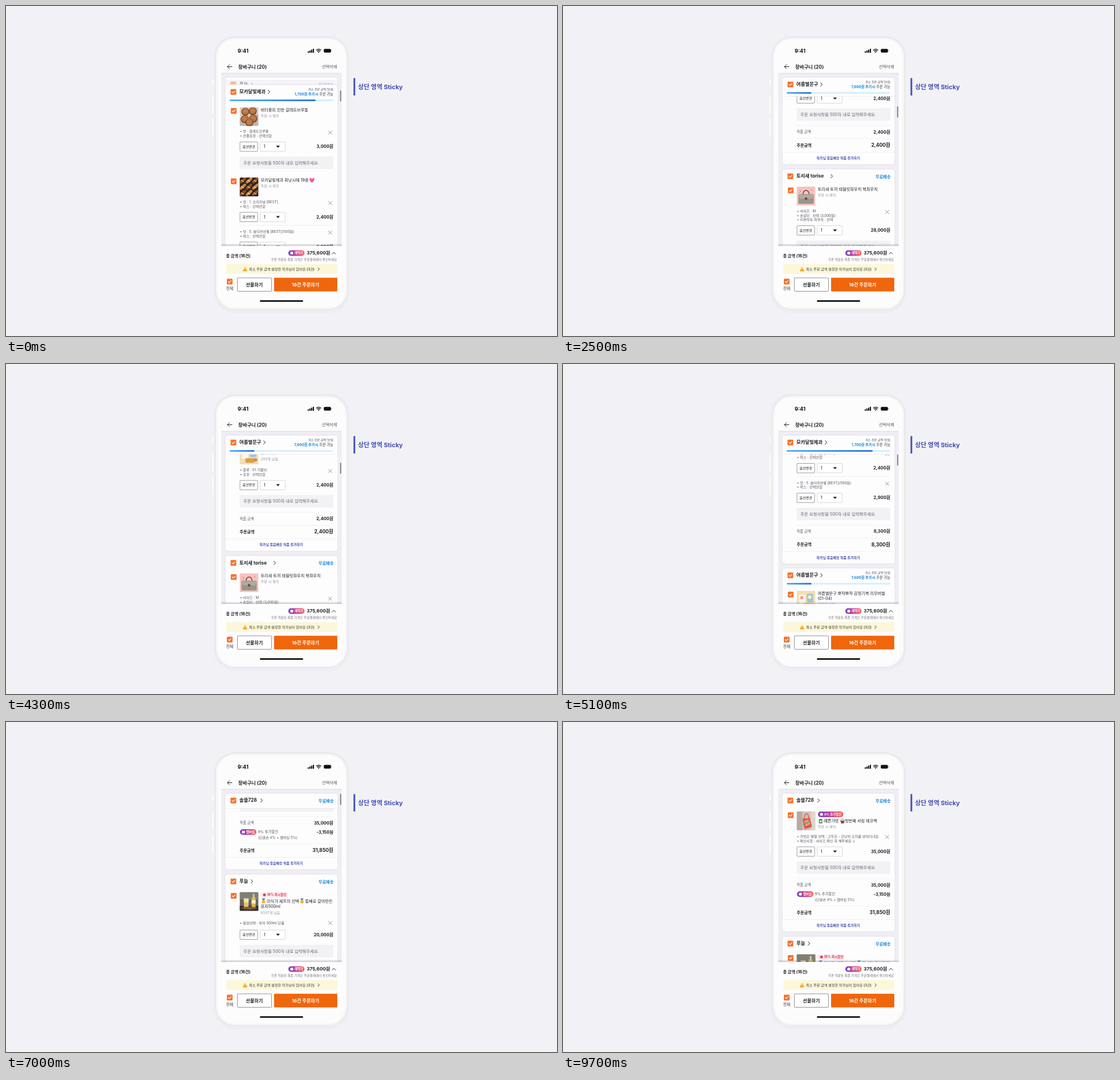
An HTML page for the animation above (9.8 s loop, 968 by 579 pixels).

```html
<!DOCTYPE html>
<html lang="ko">
<head>
<meta charset="utf-8">
<title>상단 영역 Sticky</title>
<style>
html, body { margin: 0; width: 100%; height: 100%; overflow: hidden; background: #f2f2f6; }
svg { display: block; width: 968px; height: 579px; }
text { font-family: Inter, "Noto Sans CJK KR", "Noto Sans CJK", "Noto Sans", sans-serif; white-space: pre; }
</style>
</head>
<body>
<svg id="stage" viewBox="0 0 968 579"></svg>
<script>
const LOOP = 9800, STICK = 125, INK = '#222226', GREY = '#55555c', ORANGE = '#f8702a', BLUE = '#1687e0', LINK = '#3c48b4';

// ---- drawing helpers ----
const attrs = o => Object.entries(o).map(([k, v]) => ` ${k}="${v}"`).join('');
const rect = (x, y, w, h, fill, o = {}) => `<rect x="${x}" y="${y}" width="${w}" height="${h}" fill="${fill}"${attrs(o)}/>`;
const disc = (x, y, r, fill) => `<circle cx="${x}" cy="${y}" r="${r}" fill="${fill}"/>`;
const line = (d, color = INK, w = 1) =>
  `<path d="${d}" fill="none" stroke="${color}" stroke-width="${w}" stroke-linecap="round" stroke-linejoin="round"/>`;
const fillPath = (d, fill) => `<path d="${d}" fill="${fill}"/>`;
// y is the optical middle of the text
const text = (x, y, s, size, color = INK, weight = 400, anchor = 'start') =>
  `<text x="${x}" y="${(y + size * .36).toFixed(2)}" font-size="${size}" fill="${color}" font-weight="${weight}" text-anchor="${anchor}">${s}</text>`;
const right = (x, y, s, size, color, weight) => text(x, y, s, size, color, weight, 'end');
const mid = (x, y, s, size, color, weight) => text(x, y, s, size, color, weight, 'middle');
const check = (x, y) => rect(x - 5, y - 5, 10, 10, ORANGE, { rx: 1 }) +
  line(`M${x - 2.4} ${y}l1.8 1.8 3.2-3.4`, '#fff', 1.1);
const rule = (y, x = 410.5) => rect(x, y, 583 - x - (x > 400 ? 8 : 0), .7, '#ececf0');
const pill = (x, y, w, label) => rect(x, y - 5, w, 10, 'url(#member)', { rx: 5 }) +
  disc(x + 6, y, 2.6, '#fff') + text(x + 11, y, label, 5.4, '#fff', 700);

// ---- product pictures, 33 x 33 ----
const pics = {
  cookies: rect(0, 0, 33, 33, '#d9cdc7') + fillPath('M0 20L33 12V33H0z', '#bfb2ad') +
    [[10, 8], [23, 7], [9, 21], [24, 20], [17, 27]].map(([x, y]) =>
      disc(x, y, 7, '#7d4526') + disc(x, y - .8, 5.6, '#b97743') + line(`M${x - 3} ${y - 2}l6 2`, '#d9a06b', .8)).join(''),
  cakes: rect(0, 0, 33, 33, '#35211b') + [0, 1, 2, 3, 4, 5, 6, 7, 8].map(i => {
    const x = 5 + i % 3 * 11, y = 5 + Math.floor(i / 3) * 11;
    return line(`M${x - 3} ${y + 3}l7-6`, i % 2 ? '#c98a3b' : '#8a5229', 4.6) + line(`M${x - 2} ${y}l4 2`, '#f1ddb0', 1.2);
  }).join(''),
  seals: rect(0, 0, 33, 33, '#f3dfae') + rect(4, 7, 11, 16, '#fff8ea', { rx: 2 }) + rect(18, 5, 11, 15, '#9cc7d6', { rx: 2 }) +
    disc(9, 12, 3, '#e9a08b') + disc(23, 11, 3, '#fff3d0') + rect(10, 22, 16, 8, '#d9a24e', { rx: 2 }) + disc(28, 25, 3, '#e37f6b'),
  pouch: rect(0, 0, 33, 33, '#f6c3c0') + line('M11 14C11 4 22 4 22 14', '#7b4c42', 1.6) +
    rect(3, 13, 27, 17, '#99958a', { rx: 2 }) + fillPath('M3 14H30L28 21H5z', '#b0ab9f') +
    rect(14.5, 19, 4, 4, '#6d4a3e') + line('M5 6l3 3M25 5l3 2M4 11l2-2', '#e66f70', 1),
  drink: rect(0, 0, 33, 33, '#66645c') + rect(0, 0, 33, 13, '#817f74') + fillPath('M0 24H33V33H0z', '#332e2b') +
    fillPath('M7 11h9l-1 16H8z', '#f1e3ad') + rect(8, 18, 7, 8, '#e9c25c') + rect(21, 9, 7, 18, '#e5b64a', { rx: 2 }) +
    rect(23, 3, 3, 7, '#d9c99a') + rect(21, 14, 7, 6, '#fff2ce') + '<ellipse cx="17" cy="28" rx="13" ry="2.4" fill="#7f5b3c"/>',
  bag: rect(0, 0, 33, 33, '#cfc2ba') + rect(0, 0, 10, 33, '#b9aaa3') + rect(25, 0, 8, 33, '#ddd5cf') +
    line('M13 14C14 1 20 1 22 13', '#d9674b', 1.6) + fillPath('M10 13L23 11 27 27 14 31z', '#dc5b44') +
    fillPath('M13 17l7-3 4 8-8 4z', '#f09a7d') + line('M12 23l12-6', '#6d9d90', 2)
};

// ---- parts of a card (y is measured from the card's top) ----
const options = (list, y, xy, row, price) =>
  list.map((s, i) => text(411, y + i * 7.6, '• ' + s, 6.2, GREY)).join('') +
  line(`M566.5 ${xy - 3}l6 6m0-6l-6 6`, '#77777d', .8) +
  rect(411, row - 8, 31, 16.5, '#fff', { stroke: '#85858b', 'stroke-width': .8, rx: 1 }) + mid(426.5, row, '옵션변경', 6, INK, 500) +
  rect(446.5, row - 8, 44, 16.5, '#fff', { stroke: '#cfcfd4', 'stroke-width': .8, rx: 1 }) + text(452.5, row, '1', 7.4) +
  fillPath(`M474.5 ${row - 1.4}h6.6l-3.3 3.6z`, INK) + right(575, row, price + '원', 7.6, INK, 700);

const item = (y, pic, title, sub) => check(400, y + 6.5) +
  `<g transform="translate(410.5 ${y})" clip-path="url(#thumb)">${pics[pic]}</g>` +
  title.map(([x, dy, s]) => text(x, y + dy, s, 7.2)).join('') + text(447.5, y + sub[0], sub[1], 6.2, '#96969c');

const request = y => rect(410.5, y, 164.5, 22, '#f2f1f4', { rx: 1 }) +
  text(417, y + 11, '주문 요청사항을 500자 내로 입력해주세요.', 7.4, '#68686f');

const sums = (r, price, total, extra = '') => {
  const t = r + (extra ? 89.5 : 64.5);
  return request(r) + rule(r + 30) + text(410.5, r + 41.5, '작품 금액', 6.3, GREY) +
    right(575, r + 41.5, price + '원', 7.6, INK, 700) + extra + rule(t - 11.5) +
    text(410.5, t, '주문금액', 7.1, INK, 700) + right(575, t, total + '원', 8.6, INK, 700) +
    rule(t + 12, 385) + mid(483.5, t + 23, '작가님 묶음배송 작품 추가하기', 6, LINK, 600);
};
const member = (y, off) => pill(411, y, 29, '멤버십') + text(442.5, y, '9% 추가할인', 6.4, GREY) +
  text(442.5, y + 10, '(단골손 4% + 멤버십 5%)', 6.2, GREY) + right(575, y, `-${off}원`, 7.4, INK, 700);
const medal = (x, y) => fillPath(`M${x - 3} ${y - 5}h6l-3 5z`, '#4b83cf') + disc(x, y + 1, 3, '#f0b52e');
const heart = fillPath('M537.5 172.2c-7-5.5-4-9.4-1.600-8.300l1.600 1.500 1.600-1.500c2.400-1.100 5.400 2.800-1.600 8.300z', '#ee5f9c');

const cards = [
  { top: 125, end: 368, name: '솔뜰728', tip: 447.5, body:
      item(32, 'bag', [[458, 16.5, '예쁜가방'], [495, 16.5, '첫번째 셔링 에코백']], [27, '주문 시 제작']) +
      pill(448, 37, 44.5, '9% 추가할인') + rect(449.5, 45, 6, 8, '#3c9b62', { rx: 1 }) + rect(451, 48, 3, 3, '#fff') +
      fillPath('M487.5 48h7l-1 5h-5z', '#8a5432') + line('M488 48c1-4 5-4 6 0', '#8a5432', .8) +
      options(['가방끈 재질 선택 : 고무끈 - 간단히 소지품 넣어다녀요.', '확인사항 : 사이즈 확인 꼭 해주세요 :)'], 76, 77, 102, '35,000') +
      sums(119.5, '35,000', '31,850', member(177, '3,150')) },
  { top: 376, end: 624.5, name: '푸늘', tip: 430.5, body:
      item(31.5, 'drink', [[458, 16, '미식가 셰프의 선택'], [525.5, 16, '통째로 갈아만든'], [447.5, 25.3, '유자500ml']], [35.8, '8337개 남음']) +
      rect(448, 31.5, 46, 9.5, '#fdecee', { rx: 1.5 }) + disc(454, 36.2, 2.5, '#e4394e') + text(458.5, 36.2, '18% 즉시할인', 5.7, '#dc344a', 700) +
      medal(452.5, 47.500) + medal(520, 47.500) +
      options(['용량선택 : 유자 500ml 단품'], 85.5, 85.5, 106, '20,000') +
      sums(124, '20,000', '18,200', member(181.5, '1,800')) },
  { top: 632, end: 1032, name: '모카달빛제과', tip: 460.5, bar: 151, need: '1,700', body:
      item(39.5, 'cookies', [[447.5, 4.5, '버터풍미 진한 갈레트브루통']], [14.8, '주문 시 제작']) +
      options(['맛 : 갈레트브루통', '선물포장 : 선택안함'], 82, 84, 108.5, '3,000') + request(126) +
      item(163, 'cakes', [[447.5, 4.5, '모카달빛제과 휘낭시에 19종']], [15, '주문 시 제작']) + heart +
      options(['맛 : 1. 오리지널 [BEST]', '박스 : 선택안함'], 206, 207.5, 232, '2,400') + rule(246.5) +
      options(['맛 : 5. 솔티카라멜 [BEST](500원)', '박스 : 선택안함'], 258, 259.5, 284, '2,900') +
      sums(301.5, '8,300', '8,300') },
  { top: 1039.5, end: 1264.5, name: '여름별문구', tip: 452.5, bar: 43.5, need: '7,600', body:
      item(40, 'seals', [[447.5, 4.2, '여름별문구 뽀작뽀작 감정기복 리무버씰'], [447.5, 13.4, '(01-04)']], [23.5, '200개 남음']) +
      options(['종류 : 01 기쁨이', '포장 : 선택안함'], 83, 84.5, 109, '2,400') + sums(126.5, '2,400', '2,400') },
  { top: 1272.5, end: 1522, name: '토리새 torise', tip: 470.5, body:
      item(31, 'pouch', [[447.5, 4.5, '토리새 토끼 태블릿파우치 북파우치']], [15, '주문 시 제작']) +
      options(['사이즈 : M', '손잡이 : 선택 (3,000원)', '리뷰약속 파우치 : 선택'], 74, 75.5, 107.5, '28,000') +
      sums(125.5, '28,000', '28,000', right(550, 183.5, '3,000원', 7.4, INK, 700) +
        rect(554.5, 179, 20, 10, '#fff', { stroke: '#85858b', 'stroke-width': .7 })) }
];

const header = c => {
  const h = c.bar ? 33 : 26;
  const side = c.bar
    ? right(575, 8, '최소 주문 금액 1만원', 5.1, GREY) +
      right(575, 17, `<tspan fill="${BLUE}" font-weight="700">${c.need}원 추가시</tspan> 주문 가능`, 6.3, '#333338', 500) +
      rect(393, 26, 182, 3, '#d8effc', { rx: 1.5 }) + rect(393, 26, c.bar, 3, 'url(#bar)', { rx: 1.5 })
    : right(575.5, 13.5, '무료배송', 7.2, BLUE, 700);
  return fillPath(`M385 ${h}V5a5 5 0 0 1 5-5h188a5 5 0 0 1 5 5V${h}z`, '#fdfdfe') +
    line(`M385 ${h}V5a5 5 0 0 1 5-5h188a5 5 0 0 1 5 5V${h}`, '#e2dfea', .8) +
    `<g class="edge">${rect(385, h, 198, .7, '#e9e9ee')}</g>` +
    check(399.5, 12.8) + text(410, 12.5, c.name, 8.3, INK, 700) + line(`M${c.tip} 9.700l3.200 3-3.200 3`, INK, 1) + side;
};

const phone = rect(362.5, 128, 4, 10, '#fff', { rx: 1 }) + rect(362.5, 157, 4, 33, '#fff', { rx: 1 }) +
  rect(362.5, 198.5, 4, 32, '#fff', { rx: 1 }) +
  rect(366, 54, 236, 482, '#c9c9d2', { rx: 37, filter: 'url(#soft)', opacity: .45 }) +
  rect(365, 52, 238, 483.5, '#fcfcfd', { rx: 37 }) +
  `<g clip-path="url(#shell)">${rect(365, 52, 238, 483.5, 'none', { rx: 37, stroke: '#d5d5dc', 'stroke-width': 5, filter: 'url(#soft)' })}</g>` +
  rect(365.4, 52.4, 237.2, 482.7, 'none', { rx: 37, stroke: '#fff', 'stroke-width': .8 });

const topBar = text(407, 78.5, '9:41', 9.2, '#111', 700) +
  [0, 1, 2, 3].map(i => rect(530 + i * 3, 79.5 - i * 1.5, 2.1, 2.5 + i * 1.500, '#111', { rx: .6 })).join('') +
  line('M545.5 77.300q3.800-3.400 7.600 0M547 79.200q2.300-2 4.600 0', '#111', 1.3) + disc(549.3, 81.1, 1, '#111') +
  rect(558.3, 75.2, 12.6, 6.6, '#111', { rx: 2 }) + rect(571.5, 77.2, 1, 2.6, '#999') +
  line('M397 106.500h-8m3.600-3.600l-3.600 3.600 3.600 3.600', INK, 1) +
  text(408, 106.5, '장바구니 (20)', 8.4, INK, 700) + right(581.5, 106.5, '선택삭제', 7.2, GREY);

const footer = rect(378, 421, 212, 85, '#fdfdfe') +
  text(386.5, 438, '총 금액 (16건)', 7.2, INK, 700) + pill(496, 433.5, 28.5, '혜택가') +
  right(569.5, 433.5, '375,600원', 8.2, INK, 700) + line('M573 435.200l3-3 3 3', INK, 1) +
  right(581.5, 445, '쿠폰 적용된 최종 가격은 주문결제에서 확인하세요', 5.6, '#77777d') +
  rect(387, 453, 195, 17, '#fcf7d9', { rx: 1 }) +
  fillPath('M420 457.800l4.300 7.600h-8.600z', '#f2a516') + rect(419.6, 460.3, .9, 2.6, '#fff') +
  text(427, 461.7, '최소 주문 금액 설정한 작가님이 있어요 (3건)', 6.2, '#333338', 500) + line('M548 459.300l2.400 2.400-2.400 2.400', INK, .9) +
  check(393, 483.5) + mid(393, 495.3, '전체', 6.8, '#333338') +
  rect(406.5, 477, 60, 23.500, '#fff', { rx: 1, stroke: '#77777d', 'stroke-width': .8 }) + mid(436.2, 488.8, '선물하기', 8.1, INK, 700) +
  rect(471, 476.7, 111, 24, '#f0660c', { rx: 1 }) + mid(526.3, 488.8, '16건 주문하기', 8.1, '#fff', 700) +
  rect(446, 516.2, 76, 2.8, '#111', { rx: 1.4 });

const stage = document.getElementById('stage');
stage.innerHTML = `<defs>
  <linearGradient id="member"><stop stop-color="#7b3fc4"/><stop offset=".5" stop-color="#c2479f"/><stop offset="1" stop-color="#ff6652"/></linearGradient>
  <linearGradient id="bar"><stop stop-color="#58b2ff"/><stop offset="1" stop-color="#2f78dc"/></linearGradient>
  <linearGradient id="fall" x2="0" y2="1"><stop stop-color="#77718a" stop-opacity="0"/><stop offset="1" stop-color="#77718a" stop-opacity=".4"/></linearGradient>
  <filter id="soft" x="-10%" y="-10%" width="120%" height="120%"><feGaussianBlur stdDeviation="2.5"/></filter>
  <clipPath id="shell"><rect x="365" y="52" width="238" height="483.5" rx="37"/></clipPath>
  <clipPath id="view"><rect x="378" y="118" width="212" height="303"/></clipPath>
  <clipPath id="inner"><rect x="384" y="130" width="200" height="291"/></clipPath>
  <clipPath id="thumb"><rect width="33" height="33" rx="1.5"/></clipPath></defs>` +
  rect(0, 0, 968, 579, '#f2f2f6') + phone + topBar + rect(378, 118, 212, 303, '#f0eef4') +
  `<g clip-path="url(#view)">` + cards.map(c => `<g class="card">
    ${rect(385, 0, 198, 0, '#fdfdfe', { rx: 5, stroke: '#e2dfea', 'stroke-width': .8 })}
    <g clip-path="url(#inner)"><g class="body">${c.body}</g></g><g class="head">${header(c)}</g></g>`).join('') + '</g>' +
  rect(378, 117.6, 212, .8, '#d4d3da') +
  `<g id="thumbBar">${rect(586.8, 0, 2.2, 19.5, '#8c8c92', { rx: 1.1 })}</g>` +
  rect(378, 416.5, 212, 4.5, 'url(#fall)') + footer +
  rect(610.5, 126.5, 3, 30.5, '#4350b8') + text(618.5, 142.5, '상단 영역 Sticky', 10.9, '#424db8', 700);

const parts = [...stage.querySelectorAll('.card')].map(g => ({
  g, box: g.querySelector('rect'), body: g.querySelector('.body'), head: g.querySelector('.head'), edge: g.querySelector('.edge')
}));
const thumbBar = document.getElementById('thumbBar');

// ---- scrolling: monotone cubic through time / offset pairs ----
const keys = [[0, 494], [1000, 662.5], [2500, 986.5], [3300, 1032.5], [3700, 1035], [5100, 681.5], [7000, 109], [8100, 0], [9800, 0]];
const rate = i => (keys[i + 1][1] - keys[i][1]) / (keys[i + 1][0] - keys[i][0]);
const slopes = keys.map((k, i) => {
  if (i === 0) return rate(0);
  if (i === keys.length - 1) return 0;
  const a = rate(i - 1), b = rate(i);
  return a * b > 0 ? 2 * a * b / (a + b) : 0;
});
function scrollAt(t) {
  let i = 0;
  while (i < keys.length - 2 && t >= keys[i + 1][0]) i++;
  const [t0, a] = keys[i], [t1, b] = keys[i + 1], h = t1 - t0, u = (t - t0) / h, v = 1 - u;
  return a * v * v * (1 + 2 * u) + b * u * u * (3 - 2 * u) + h * u * v * (slopes[i] * v - slopes[i + 1] * u);
}
const clamp = x => Math.max(0, Math.min(1, x));

function render(t) {
  const s = scrollAt(t);
  cards.forEach((c, i) => {
    const p = parts[i], top = c.top - s, end = c.end - s, y = Math.max(top, STICK);
    const next = cards[i + 1] ? cards[i + 1].top - s : 999;
    const shown = next > STICK && top < 425;
    p.g.setAttribute('display', shown ? 'inline' : 'none');
    if (!shown) return;
    p.box.setAttribute('y', y);
    p.box.setAttribute('height', Math.max(0, end - y));
    p.body.setAttribute('transform', `translate(0 ${top})`);
    p.head.setAttribute('transform', `translate(0 ${y})`);
    p.head.setAttribute('opacity', clamp((next - STICK) / 28));
    p.edge.setAttribute('opacity', top < STICK - 1 ? 1 : 0);
  });
  thumbBar.setAttribute('transform', `translate(0 ${126 + (s - 109) * .057})`);
  thumbBar.setAttribute('opacity', clamp((8900 - t) / 300));
}

// The picture advances ten times a second.
const start = performance.now();
function tick() {
  const t = (performance.now() - start) % LOOP;
  render(Math.min(97, Math.floor(t / 100 + .2)) * 100);
  requestAnimationFrame(tick);
}
tick();
</script>
</body>
</html>
```
